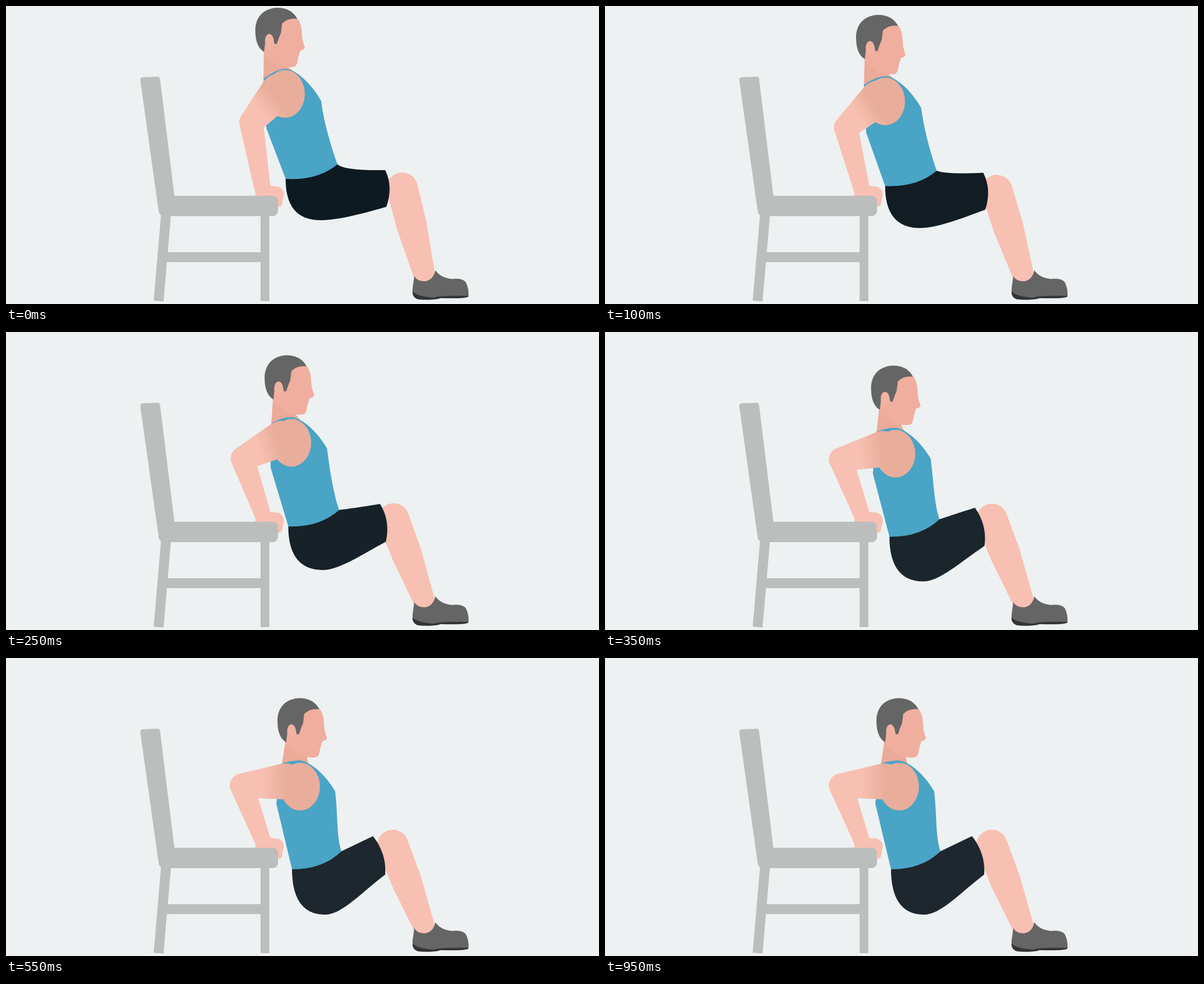
Write an HTML page with a canvas that moves like this. It is 1018 px wide and 512 px high and loops after 1 s.

```html
<!DOCTYPE html>
<html lang="en">
<head>
<meta charset="utf-8">
<title>Chair dip</title>
<style>
html, body { margin: 0; width: 100%; height: 100%; overflow: hidden; background: #edf1f1; }
canvas { display: block; }
</style>
</head>
<body>
<canvas id="stage" width="1018" height="512"></canvas>
<script>
const ctx = document.getElementById('stage').getContext('2d');
const LOOP = 1000, STEP = 50, DIP = 490;
const SKIN = '#f8c0b2', SHADE = '#e9ad9b', GREY = '#bcbebd', DARK = '#666566';

const lerp = (a, b, k) => a + (b - a) * k;
const mix = (a, b, k) => ({ x: lerp(a.x, b.x, k), y: lerp(a.y, b.y, k) });
const pt = (x, y) => ({ x, y });
const add = (a, x, y) => pt(a.x + x, a.y + y);

// Depth of the dip: steady start, quick middle, soft stop.
function depth(ms) {
  const u = Math.min(ms / DIP, 1), v = 1 - u;
  return u + u * u * v - 2.5 * u * u * v ** 3;
}

// Joints from the top pose to the bottom pose: the trunk sinks evenly and
// swings forward late, while elbow and knee bend early.
function rig(p) {
  const late = p ** 1.5, early = 1 - (1 - p) ** 3;
  const trunk = (x0, y0, x1, y1) => pt(lerp(x0, x1, late), lerp(y0, y1, p));
  const bend = (x0, y0, x1, y1) => pt(lerp(x0, x1, early), lerp(y0, y1, early));
  return {
    head: trunk(-38, -66, 0, 0),
    nape: trunk(442, 125, 474, 181),
    collar: trunk(479, 108, 502, 176),
    chest: trunk(541, 163, 565, 229),
    shoulder: trunk(479, 151, 505, 221),
    armpit: trunk(468, 147, 480, 212),
    back: trunk(447, 210, 464, 250),
    waist: trunk(480, 297, 491, 363),
    hip: trunk(569, 272, 576, 332),
    seat: trunk(540, 368, 548, 441),
    hemTop: trunk(651, 282, 630, 306),
    hemLow: trunk(653, 345, 651, 372),
    elbow: bend(421, 200, 405, 219),
    knee: bend(680, 313, 664, 322),
    wrist: pt(440, 312),
    ankle: pt(719, 465)
  };
}

// Tapered round-ended limb between two circles.
function limb(a, ra, b, rb, fill) {
  const dir = Math.atan2(b.y - a.y, b.x - a.x);
  const side = Math.acos((ra - rb) / Math.hypot(b.x - a.x, b.y - a.y));
  ctx.beginPath();
  ctx.arc(a.x, a.y, ra, dir + side, dir - side + 2 * Math.PI);
  ctx.arc(b.x, b.y, rb, dir - side, dir + side);
  ctx.fillStyle = fill;
  ctx.fill();
}

function ellipse(c, rx, ry, fill) {
  ctx.beginPath();
  ctx.ellipse(c.x, c.y, rx, ry, 0, 0, 2 * Math.PI);
  ctx.fillStyle = fill;
  ctx.fill();
}

// Closed outline: each part is [end], [control, end] or [control, control, end].
function outline(start, parts, fill) {
  ctx.beginPath();
  ctx.moveTo(start.x, start.y);
  for (const part of parts) {
    const xy = part.flatMap(q => [q.x, q.y]);
    if (part.length === 1) ctx.lineTo(...xy);
    else if (part.length === 2) ctx.quadraticCurveTo(...xy);
    else ctx.bezierCurveTo(...xy);
  }
  ctx.fillStyle = fill;
  ctx.fill();
}

function svg(d, fill) {
  ctx.fillStyle = fill;
  ctx.fill(new Path2D(d));
}

function bar(x0, y0, x1, y1, width) {
  ctx.lineWidth = width;
  ctx.beginPath();
  ctx.moveTo(x0, y0);
  ctx.lineTo(x1, y1);
  ctx.stroke();
}

function drawChair() {
  ctx.strokeStyle = ctx.fillStyle = GREY;
  bar(275, 355, 262, 507, 17);
  bar(444.5, 355, 444.5, 507, 15);
  bar(272, 431.5, 440, 431.5, 17);
  ctx.beginPath();
  ctx.roundRect(262, 326, 205, 35, 9);
  ctx.fill();
  const rest = new Path2D('M235 127L260 126L285 330L266 348Z');
  ctx.lineJoin = 'round';
  ctx.lineWidth = 9;
  ctx.stroke(rest);
  ctx.fill(rest);
}

function drawLeg(j) {
  const calf = mix(j.knee, j.ankle, 0.42);
  limb(j.knee, 27, calf, 26, SKIN);
  limb(calf, 26, j.ankle, 18, SKIN);
  svg('M701 464Q705 473 720 473Q734 470 737 454Q746 467 765 469Q782 467 789 474Q795 485 794 499' +
    'Q790 504 745 501Q735 506 708 504Q697 501 698 485Z', DARK);
  svg('M698 490Q704 499 735 501Q746 497 794 498Q794 503 746 502Q735 506 708 504Q697 501 698 490Z', '#343437');
}

function drawHead(j) {
  const h = j.head;
  outline(add(h, 481, 134), [[j.nape], [add(j.collar, 17, 6)], [add(h, 516, 166)]], '#ecaa99');
  ctx.save();
  ctx.translate(h.x, h.y);
  svg('M480 134L481 150L505 168Q525 173 534 170Q538 167 539 157L543 143' +
    'Q551 141 551 137Q546 126 546 112Q545 95 538 87L505 88Z', '#f0ae9e');
  svg('M538 88Q528 69 504 69C478 70 466 87 466 108Q466 136 481 145L484 120L497 121L499 131H503' +
    'Q506 121 510 112L512 96Q522 86 538 88Z', DARK);
  ellipse(pt(490, 126), 7.5, 12, '#f1b2a2');
  ctx.restore();
}

function drawVest(j) {
  outline(j.nape, [
    [add(j.collar, -16, 1), j.collar],
    [add(j.collar, 18, 0), add(j.chest, -17, -30), j.chest],
    [add(j.chest, 5, 40), add(j.hip, -9, -25), j.hip],
    [add(mix(j.waist, j.hip, 0.5), 10, 40), j.waist],
    [j.back]
  ], '#49a4c6');
}

function drawShorts(j, p) {
  outline(j.waist, [
    [add(mix(j.waist, j.hip, 0.5), 10, 16), j.hip],
    [add(mix(j.hip, j.hemTop, 0.5), -30 * (1 - p), 6 * (1 - p)), j.hemTop],
    [add(mix(j.hemTop, j.hemLow, 0.5), 13, -3), j.hemLow],
    [add(mix(j.hemLow, j.seat, 0.4), 0, 4), add(j.seat, 28, 0), j.seat],
    [add(j.seat, -42, 0), add(j.waist, 0, 45), j.waist]
  ], `rgb(${14 + 16 * p},${26 + 13 * p},${33 + 13 * p})`);
}

function drawArm(j) {
  const tone = ctx.createLinearGradient(j.elbow.x, j.elbow.y, j.shoulder.x, j.shoulder.y);
  tone.addColorStop(0.35, SKIN);
  tone.addColorStop(0.75, SHADE);
  ellipse(j.shoulder, 34, 41, tone);
  limb(j.armpit, 31, j.elbow, 20.5, tone);
  limb(j.elbow, 20.5, j.wrist, 14, SKIN);
  limb(add(j.wrist, 2, 10), 14, add(j.wrist, 23, 12), 14, SKIN);
  limb(add(j.wrist, 27, 14), 9, add(j.wrist, 28, 27), 6, SKIN);
}

function draw(p) {
  const j = rig(p);
  ctx.fillStyle = '#edf1f1';
  ctx.fillRect(0, 0, 1018, 512);
  drawLeg(j);
  drawHead(j);
  drawVest(j);
  drawShorts(j, p);
  drawArm(j);
  drawChair();
}

function tick() {
  const ms = performance.now() % LOOP;
  draw(depth(Math.floor(ms / STEP) * STEP));
  requestAnimationFrame(tick);
}
tick();
</script>
</body>
</html>
```
